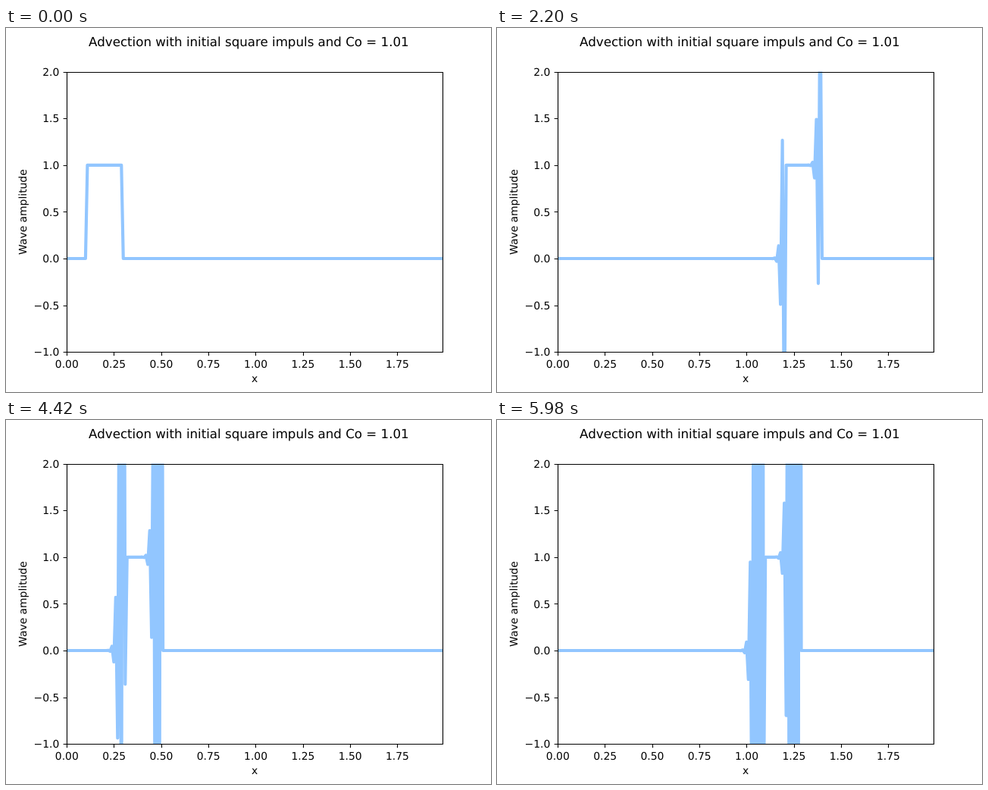
An HTML page for the animation above (6 s loop, 640 by 480 pixels).

```html
<!DOCTYPE html>
<html lang="en">
<head>
<meta charset="utf-8">
<title>Advection of a square pulse</title>
<style>
  html, body { margin: 0; width: 100%; height: 100%; overflow: hidden; background: #fff; }
  svg { display: block; width: 640px; height: 480px; }
  text { font: 13.889px "DejaVu Sans", sans-serif; text-rendering: geometricPrecision; }
  .title { font-size: 16.667px; }
  .mid { text-anchor: middle; }
  .end { text-anchor: end; }
  #wave { fill: none; stroke: #92c6ff; stroke-width: 4.167; stroke-linejoin: round; stroke-linecap: square; }
  #axes { fill: none; stroke: #000; stroke-width: 1.11; }
</style>
</head>
<body>
<svg viewBox="0 0 640 480">
  <clipPath id="plot"><rect x="80" y="57.6" width="496" height="369.6"/></clipPath>
  <g clip-path="url(#plot)"><path id="wave"/></g>
  <path id="axes"/>
  <g id="labels"></g>
  <text class="title mid" x="320.4" y="24">Advection with initial square impuls and Co = 1.01</text>
  <text class="mid" x="328" y="467">x</text>
  <text class="mid" transform="translate(27 242.6) rotate(-90)">Wave amplitude</text>
</svg>
<script>
  const COURANT = 1.01, CELLS = 200, STEPS = 300, STEP_MS = 20;
  const $ = id => document.getElementById(id);
  const px = x => 80 + x * 496 / 1.99;
  const py = y => 304 - y * 123.2;
  const snap = v => Math.floor(v + 0.5) + 0.5;

  function drawAxes() {
    let d = "M80.5 58.5H576.5V427.5H80.5Z", labels = "";
    const label = (cls, x, y, s) => labels += `<text class="${cls}" x="${x}" y="${y}">${s}</text>`;
    for (let x = 0; x < 2; x += 0.25) {
      d += `M${snap(px(x))} 427.5v4.86`;
      label("mid", px(x) + 0.3, 448, x.toFixed(2));
    }
    for (let y = -1; y <= 2; y += 0.5) {
      d += `M80.5 ${snap(py(y))}h-4.86`;
      label("end", 70.3, Math.round(py(y) + 5.2), y.toFixed(1).replace("-", "\u2212"));
    }
    $("axes").setAttribute("d", d);
    $("labels").innerHTML = labels;
  }

  // Upwind step; the inflow cell repeats the outflow cell, never below zero.
  const advance = u => u.map((v, i) =>
    i ? v - COURANT * (v - u[i - 1]) : Math.max(0, u[CELLS - 1]));

  const toPath = u => "M" + u.map((v, i) => px(i / 100).toFixed(2) + " " + py(v).toFixed(2)).join("L");

  const paths = [];
  let u = Array.from({ length: CELLS }, (_, i) => i > 10 && i < 30 ? 1 : 0);
  for (let n = 0; n < STEPS; n++) {
    paths.push(toPath(u));
    u = advance(u);
  }

  let shown = -1;
  function draw() {
    const n = Math.floor(performance.now() / STEP_MS + 0.001) % STEPS;
    if (n !== shown) $("wave").setAttribute("d", paths[shown = n]);
    requestAnimationFrame(draw);
  }

  drawAxes();
  draw();
</script>
</body>
</html>
```
